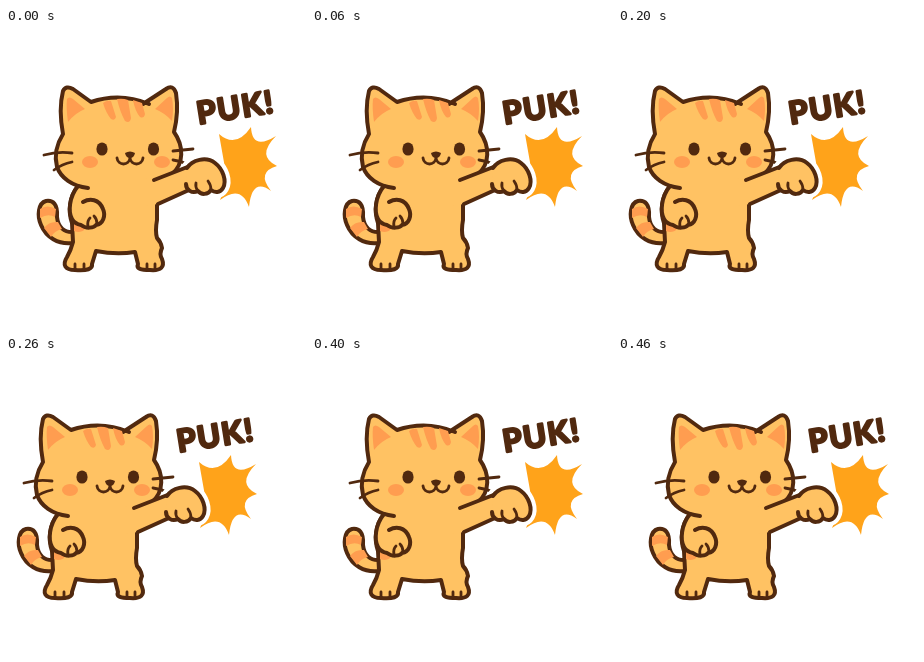
An HTML page that plays this animation: 300x300 px, repeating every 0.5 s.

```html
<!DOCTYPE html>
<html lang="en">
<head>
<meta charset="utf-8">
<title>Punching cat</title>
<style>
  html, body { margin: 0; width: 100%; height: 100%; overflow: hidden; background: #fff; }
  svg { display: block; width: 100vw; height: 100vh; }
  .line { fill: none; stroke: #51290f; stroke-width: 4; stroke-linecap: round; stroke-linejoin: round; }
  .fur { fill: #ffc263; }
  .thin { stroke-width: 2.8; }
  .patch { fill: #ff9d50; }
  .dark { fill: #51290f; }
  text { font: 700 31px Lato, sans-serif; letter-spacing: 1.5px; stroke: #51290f; stroke-width: 2.6; stroke-linejoin: round; }
</style>
</head>
<body>
<svg viewBox="0 0 300 300">
  <defs>
    <path id="fist" d="M181 140 C186 132 200 128 209 135 C217 141 221 153 217 160 C214 165 209 165 205 162 C202 167 195 167 192 163 C186 166 180 162 180 156"/>
  </defs>
  <g id="scene">
    <path fill="#ffa31a" d="M213 106 Q230 121 245 99 Q246 123 270 108 Q250 128 271 138 Q250 144 265 163 Q246 149 243 179 Q235 156 214 172 L219 160 V140 Z"/>
    <text class="dark" x="229.5" y="90.5" text-anchor="middle" transform="rotate(-9 228.5 79.5)">PUK!</text>

    <!-- tail -->
    <path class="line fur" d="M68 204 C58 205 52 199 51 189 C52 176 47 172 40 173 C32 175 31 188 35 197 C40 209 52 217 67 215"/>
    <path class="patch" d="M34 181 Q41 176 50 181 L49 189 Q42 185 34 190 Z M38 200 Q43 193 52 194 L56 201 Q48 203 45 209 Z"/>

    <!-- body -->
    <path class="line fur" d="M72 158 C63 169 62 184 66 195 L67 214 Q65 222 61 229 C56 237 59 242 69 242 C81 243 87 241 86 236 L90 223 Q110 227 129 224 L132 236 C130 241 135 242 144 242 C155 243 159 239 156 231 Q153 226 156 220 Q155 214 151 210 Q149 203 151 192 V154 Z"/>
    <path class="patch" d="M68 193 L80 199 Q77 206 68 203 Z"/>
    <path class="line thin" d="M69 241 v-5 M78 241 v-5 M141 241 v-5 M149 241 v-5"/>

    <!-- head -->
    <path class="fur" d="M57 106 C54 90 54 75 57 63 Q60 57 67 61 L85 74 Q114 66 144 74 L160 61 Q167 56 170 65 C172 78 171 92 168 104 C178 118 178 136 166 146 L146 162 H82 Q60 158 53 145 C46 132 48 119 57 106 Z"/>
    <path class="line" d="M82 160 C66 158 55 150 51 139 C48 127 50 117 57 106 C54 90 54 75 57 63 Q60 57 67 61 L85 74 Q114 64 143 76 M137 76 L160 61 Q167 56 170 65 C172 78 171 92 168 104 C178 118 178 136 166 146"/>
    <path class="patch" d="M62 94 Q60 80 61 71 Q63 68 67 71 L79 81 Q69 85 62 94 Z M166 93 Q168 80 166 70 Q164 67 161 70 L149 81 Q159 85 166 93 Z"/>
    <path class="patch" d="M97 75 Q101 72 105 73 L110 89 Q109 93 105 91 Q100 85 97 75 Z M111 71 Q117 70 122 72 L125 90 Q124 96 119 93 Q114 84 111 71 Z M127 72 L136 75 L139 86 Q138 91 134 89 Q129 83 127 72 Z"/>
    <g class="patch">
      <ellipse cx="84" cy="134" rx="8" ry="6"/>
      <ellipse cx="156" cy="134" rx="8" ry="6"/>
    </g>
    <g class="dark">
      <ellipse cx="96" cy="121" rx="5.6" ry="6.6"/>
      <ellipse cx="147.5" cy="121" rx="5.6" ry="6.6"/>
      <path d="M119 125 Q124 122 129 125 Q128 130 124 130 Q120 130 119 125 Z"/>
    </g>
    <path class="line thin" d="M111 130 C112 138 123 138 124 130 C125 138 136 138 137 130"/>
    <path class="line thin" d="M38 127 Q52 123 66 125 M48 142 Q56 136 66 134 M167 123 L187 121 M167 132 Q175 133 181 136"/>

    <!-- punching arm -->
    <use href="#fist" fill="#fff" stroke="#fff" stroke-width="12"/>
    <path class="fur" d="M138 150 L148 152 L188 137 L184 162 L152 176 L138 178 Z"/>
    <path class="line" d="M148 152 L184 138 M152 176 L183 162"/>
    <use href="#fist" class="line fur"/>
    <path class="line thin" d="M192 163 Q189 159 190 155 M205 162 Q205 157 202 153"/>

    <!-- resting paw -->
    <path class="line fur" d="M72 158 C63 169 62 184 66 191 Q69 196 75 197 C80 201 88 200 90 197 C97 196 100 188 97 181 C93 171 84 170 77 174"/>
    <path class="line thin" d="M82 198 Q81 193 84 190 M91 196 Q91 191 88 188"/>
  </g>
</svg>
<script>
const scene = document.getElementById('scene');

// The whole picture jumps left in two steps and back again.
function draw() {
  const step = Math.floor(performance.now() % 500 / 100);
  const shift = -10 * (2 - Math.abs(step - 2));
  scene.setAttribute('transform', `translate(${shift} 0)`);
  requestAnimationFrame(draw);
}
draw();
</script>
</body>
</html>
```
